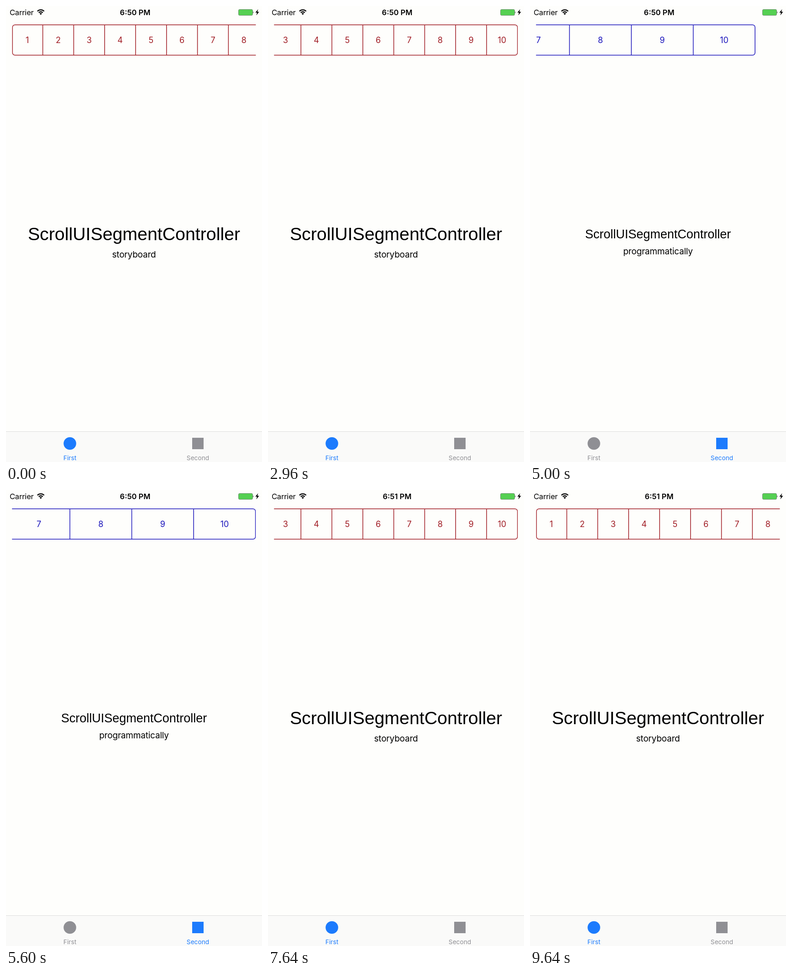
An HTML page for the animation above (9680 ms loop, 561x997 px).

```html
<!DOCTYPE html>
<html lang="en">
<head>
<meta charset="utf-8">
<title>Scrolling segments</title>
<style>
  html, body { margin: 0; width: 100%; height: 100%; overflow: hidden; background: #fefefc; }
  svg { display: block; width: 100vw; height: 100vh; font-family: Inter, Roboto, sans-serif; }
  text { text-anchor: middle; }
  .title { font-family: "Liberation Sans", Arial, sans-serif; }
  .sub { font-size: 19px; letter-spacing: -.2px; }
  .status { font-size: 16.5px; }
  .tab { font-size: 13.7px; }
  .bar rect, .bar path { fill: none; stroke: currentColor; stroke-width: 1.5; }
  .bar text { font-size: 18px; fill: currentColor; }
</style>
</head>
<body>
<svg viewBox="0 0 561 997">
  <clipPath id="view"><rect x="13.2" y="38" width="534.3" height="72"/></clipPath>

  <text class="status" x="8" y="20" style="text-anchor:start;letter-spacing:-.2px">Carrier</text>
  <g fill="none" stroke="#000" stroke-width="2.3">
    <path d="M68.8 11.5a10.4 10.4 0 0 1 14.8 0M71.8 14.6a6.2 6.2 0 0 1 8.8 0"/>
    <path d="M76.2 19.4l-2.6-2.8a3.7 3.7 0 0 1 5.2 0z" fill="#000" stroke="none"/>
  </g>
  <text class="status" id="clock" x="283" y="20" font-weight="600"></text>
  <rect x="509.5" y="7.5" width="31" height="13" rx="2.5" fill="#55d052" stroke="#79927a"/>
  <path d="M541.5 11.5q1.8 2.5 0 5z"/>
  <path d="M552.5 7l-6 7.6h3.6l-1.6 6 6.1-7.8h-3.7z"/>

  <g id="first">
    <g class="bar" color="#a01c24" clip-path="url(#view)"></g>
    <text class="title" x="280.5" y="512" font-size="39.3">ScrollUISegmentController</text>
    <text class="sub" x="280.5" y="550">storyboard</text>
  </g>
  <g id="second">
    <g class="bar" color="#1c16bc" clip-path="url(#view)"></g>
    <text class="title" x="280.5" y="508" font-size="27">ScrollUISegmentController</text>
    <text class="sub" x="280.5" y="543">programmatically</text>
  </g>

  <rect y="930" width="561" height="67" fill="#fafaf9"/>
  <rect y="930" width="561" height="1" fill="#dcdcdc"/>
  <g id="firstTab"><circle cx="140" cy="956.5" r="13.8"/><text class="tab" x="140" y="992.5">First</text></g>
  <g id="secondTab"><rect x="408" y="944" width="25" height="25"/><text class="tab" x="420.5" y="992.5">Second</text></g>
</svg>
<script>
const LOOP = 9680, STEP = 40, COUNT = 10, LEFT = 14, VIEW = 534;
const RED_W = 67.8, BLUE_W = 135.6;
const RED_MAX = RED_W * COUNT - VIEW, BLUE_MAX = BLUE_W * COUNT - VIEW;
const OPEN_SECOND = 3120, BACK_TO_FIRST = 7560, MINUTE = 6400;
const $ = id => document.getElementById(id);

function add(parent, tag, attrs) {
  const el = document.createElementNS("http://www.w3.org/2000/svg", tag);
  setAll(el, attrs);
  return parent.appendChild(el);
}

function setAll(el, attrs) {
  for (const name in attrs) el.setAttribute(name, attrs[name]);
}

function makeBar(page) {
  const group = $(page).querySelector(".bar");
  const frame = add(group, "rect", { y: 41.2, height: 66.4, rx: 5.5 });
  const lines = add(group, "path", {});
  const labels = Array.from({ length: COUNT }, (_, i) => {
    const label = add(group, "text", { y: 81 });
    label.textContent = i + 1;
    return label;
  });
  return (offset, width, opacity = 1) => {
    const left = LEFT - offset, grid = left - 1.2;
    let d = "";
    for (let i = 1; i < COUNT; i++) d += `M${grid + i * width} 41.2v66.4`;
    setAll(frame, { x: left + .2, width: Math.max(0, width * COUNT - 1.5) });
    lines.setAttribute("d", d);
    labels.forEach((label, i) => setAll(label, { x: grid + (i + .5) * width, opacity }));
  };
}

// Drag to an edge, then overshoot and settle like a critically damped spring.
function flick(t, start, drag, distance, speed) {
  if (t <= start) return 0;
  const s = (t - start - drag) / 1000;
  if (s > .7) return distance;
  if (s >= 0) return distance + speed * s * Math.exp(-10 * s);
  const u = (t - start) / drag, end = speed * drag / 1000;
  return distance * u * u * (3 - 2 * u) + end * u * u * (u - 1);
}

function grow(t) {
  const u = Math.min(1, Math.max(0, (t - OPEN_SECOND + STEP) / 400));
  return u * u * (3 - 2 * u);
}

const drawRed = makeBar("first"), drawBlue = makeBar("second");

function draw(now) {
  const t = Math.floor(now % LOOP / STEP) * STEP;
  const onSecond = t >= OPEN_SECOND && t < BACK_TO_FIRST;
  const tint = on => on ? "#1c7bfd" : "#8f8f94";

  $("clock").textContent = t < MINUTE ? "6:50 PM" : "6:51 PM";
  $("first").style.display = onSecond ? "none" : "";
  $("second").style.display = onSecond ? "" : "none";
  $("firstTab").setAttribute("fill", tint(!onSecond));
  $("secondTab").setAttribute("fill", tint(onSecond));

  if (onSecond) {
    const size = grow(t);
    drawBlue(flick(t, 4580, 250, BLUE_MAX, 1723) - flick(t, 6220, 240, BLUE_MAX, 3118), BLUE_W * size, size);
  } else {
    drawRed(flick(t, 540, 260, RED_MAX, 1899) - flick(t, 8660, 240, RED_MAX, 1500), RED_W);
  }
}

const began = performance.now();
function tick() {
  draw(performance.now() - began);
  requestAnimationFrame(tick);
}
tick();
</script>
</body>
</html>
```
